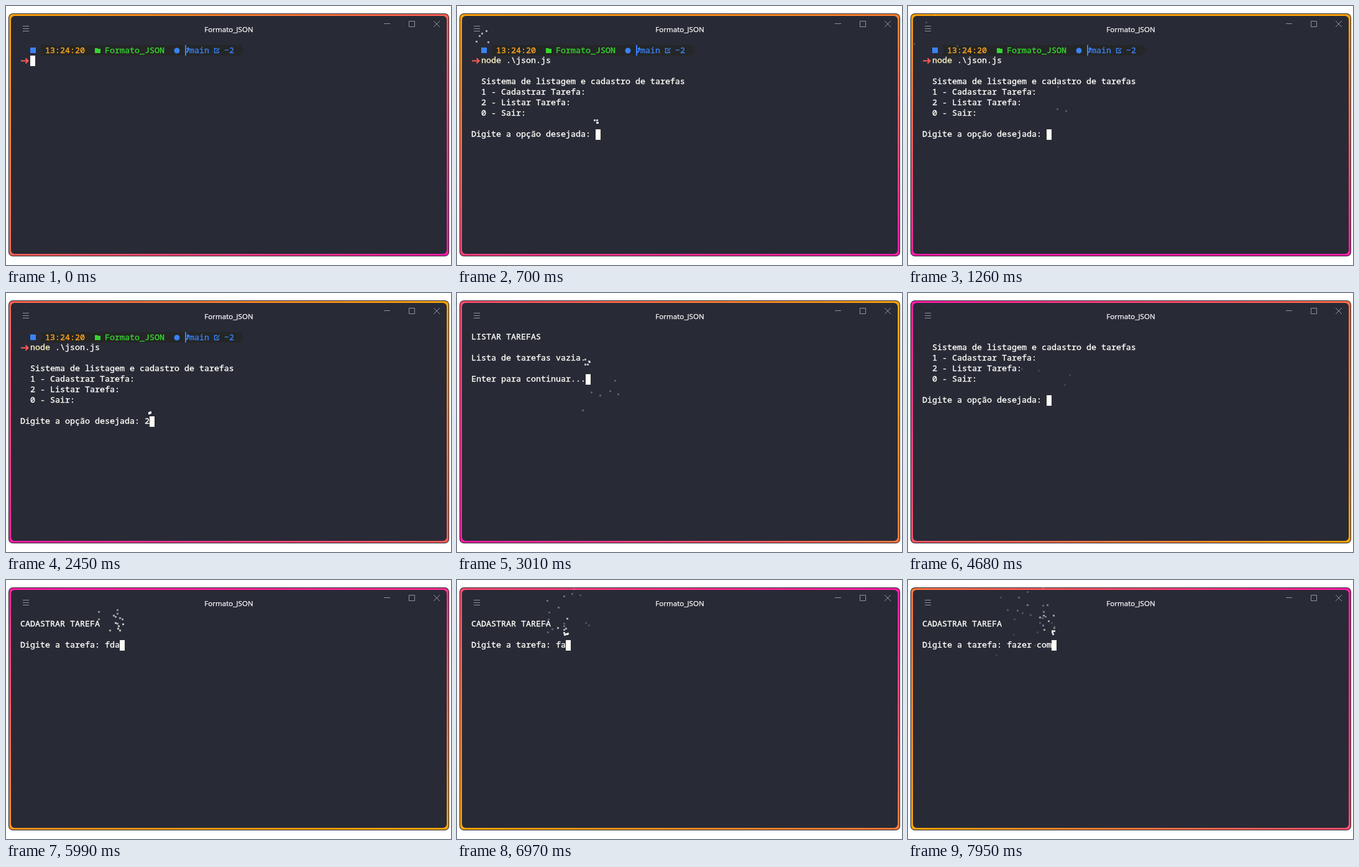
These frames come from a looping animation (716x418 px, 8000 ms). An HTML page with a canvas:

```html
<!DOCTYPE html>
<html lang="pt-BR">
<head>
<meta charset="utf-8">
<title>Formato_JSON</title>
<style>
  html, body { margin: 0; width: 100%; height: 100%; overflow: hidden; background: #fff; }
  #stage { position: relative; width: 716px; height: 418px; overflow: hidden; background: #fff; }
  #stage > * { position: absolute; box-sizing: border-box; }
  #frame { left: 4px; top: 12px; width: 709px; height: 392px; border-radius: 7px; background: #1b1b26; }
  #ring { left: 5px; top: 13px; width: 707px; height: 390px; border-radius: 6px; }
  #panel { left: 8px; top: 16px; width: 701px; height: 384px; border-radius: 6px; background: #282a36; }
  svg, canvas { left: 0; top: 0; }
  #title { left: 258px; top: 29px; width: 201px; text-align: center; color: #fff;
    font: 11.6px/18px 'Open Sans', 'Noto Sans', sans-serif; -webkit-text-stroke: .25px; }
  #screen, svg text { font: 500 13.333px/17px 'Noto Sans Mono', 'DejaVu Sans Mono', monospace; white-space: pre; }
  #screen { left: 23px; top: 62px; margin: 0; color: #fffff8; -webkit-text-stroke: .35px; }
  #screen b { font-weight: inherit; color: #faf2bf; }
  svg text { fill: currentColor; stroke: currentColor; stroke-width: .35px; }
  #cursor { width: 8px; height: 17px; background: #fffef6; }
</style>
</head>
<body>
<div id="stage">
  <div id="frame"></div>
  <div id="ring"></div>
  <div id="panel"></div>
  <svg width="716" height="418" fill="none">
    <path stroke="#92939b" d="M27 32.5h10M27 36.5h10M27 40.5h10M608 28.5h10M648.5 24.5h9v9h-9zM688 24l10 10M698 24l-10 10"/>
    <g id="prompt">
      <path fill="#242627" d="M55 63H377L383 71.5 377 80H55L58 71.5z"/>
      <path fill="#3b82f6" d="M39 67h9v9h-9z"/>
      <text x="63" y="76" color="#ffa51f">13:24:20</text>
      <path fill="#35d62f" d="M143 68h4l1 1h4v7h-9z"/>
      <text x="159" y="76" color="#35d62f">Formato_JSON</text>
      <circle cx="275" cy="72" r="4.500" fill="#3b82f6"/>
      <path stroke="#3b82f6" stroke-width="2" d="M289 63v17M289.500 75q4-1 3.500-6M291 70l2-2.500 2 2.500"/>
      <text x="295" y="76" color="#3b82f6">main</text>
      <path stroke="#3b82f6" stroke-width="1.400" d="M340 68.500h-4.500v7h6.500v-3M338.500 73l5-5"/>
      <text x="351" y="76" color="#3b82f6">~2</text>
      <path stroke="#ff5c57" stroke-width="2" d="M24 88.500h11M31.500 84.500l4 4-4 4"/>
    </g>
  </svg>
  <div id="title">Formato_JSON</div>
  <pre id="screen"></pre>
  <div id="cursor"></div>
  <canvas id="sparks" width="716" height="418"></canvas>
</div>
<script>
const LOOP = 8000, TICK = 69.74, COL = 8, ROW = 17, LEFT = 23, TOP = 63;
const GRAVITY = 0.075, FADE = 0.96;
const RING_W = 707, RING_H = 390;
const $ = id => document.getElementById(id);
const ctx = $('sparks').getContext('2d');

const menu = `
  Sistema de listagem e cadastro de tarefas
  1 - Cadastrar Tarefa:
  2 - Listar Tarefa:
  0 - Sair:

Digite a opção desejada: `;
const shell = '\n  ';
const started = shell + '<b>node</b> .\\json.js\n' + menu;
const list = 'LISTAR TAREFAS\n\nLista de tarefas vazia.\n\nEnter para continuar...';
const form = 'CADASTRAR TAREFA\n\nDigite a tarefa: ';

// Each step: [start time, screen text]; every step after the first throws sparks.
const steps = [
  [0, shell], [490, shell], [630, started], [2420, started + '2'],
  [2860, list], [3830, menu], [4780, menu + '1'], [5040, form]
];
function type(words, times) {
  words.forEach((word, i) => steps.push([times[i], form + word]));
}
type(['f', 'fd', 'fda'], [5690, 5780, 5860]);
type(['fd', 'f', ''], [6270, 6390, 6510]);
const phrase = 'fazer com';
type([...phrase].map((_, i) => phrase.slice(0, i + 1)),
  [6780, 6900, 7030, 7160, 7290, 7420, 7560, 7710, 7880]);

function randomFrom(seed) {
  return () => {
    seed = (seed * 16807) % 2147483647;
    return seed / 2147483647;
  };
}

function cursorAt(text) {
  const lines = text.replace(/<\/?b>/g, '').split('\n');
  return { x: LEFT + lines.at(-1).length * COL, y: TOP + (lines.length - 1) * ROW };
}

const scenes = steps.map(([start, text], i) => {
  const random = randomFrom(7919 * (i + 3));
  random();
  const count = i ? 4 + Math.floor(random() * 3) : 0;
  const sparks = Array.from({ length: count }, () => ({
    vx: random() * 2 - 1,
    vy: -3.5 + random() * 2
  }));
  const atPrompt = text.startsWith(shell) && !text.startsWith(menu);
  return { start, text, sparks, atPrompt, cursor: cursorAt(text) };
});

function drawSparks(time) {
  ctx.clearRect(0, 0, 716, 418);
  ctx.fillStyle = '#f8f8f2';
  for (const { start, cursor, sparks } of scenes) {
    const age = (time - start) * 0.06;
    const alpha = FADE ** age;
    if (age < 0 || alpha < 0.1) continue;
    ctx.globalAlpha = alpha;
    for (const { vx, vy } of sparks) {
      const x = cursor.x + vx * age;
      const y = cursor.y - 3 + vy * age + GRAVITY * age * age / 2;
      ctx.fillRect(Math.round(x - 1), Math.round(y - 1), 3, 3);
    }
  }
}

// The gradient turns in a unit square that is then stretched over the window.
function ringGradient(time) {
  const turn = (315 + time * 0.036) * Math.PI / 180;
  const angle = Math.atan2(Math.sin(turn) / RING_W, Math.cos(turn) / RING_H);
  return `linear-gradient(${angle}rad, #fc1da7, #fba506)`;
}

let shown;
function render(now) {
  const time = Math.floor((now % LOOP) / TICK + 0.1) * TICK;
  const scene = scenes.findLast(s => s.start <= time);
  if (scene !== shown) {
    shown = scene;
    $('screen').innerHTML = scene.text;
    $('cursor').style.left = scene.cursor.x + 'px';
    $('cursor').style.top = scene.cursor.y + 'px';
    $('prompt').style.display = scene.atPrompt ? '' : 'none';
  }
  $('ring').style.background = ringGradient(time);
  drawSparks(time);
}

const origin = performance.now();
function loop() {
  render(performance.now() - origin);
  requestAnimationFrame(loop);
}
loop();
</script>
</body>
</html>
```
